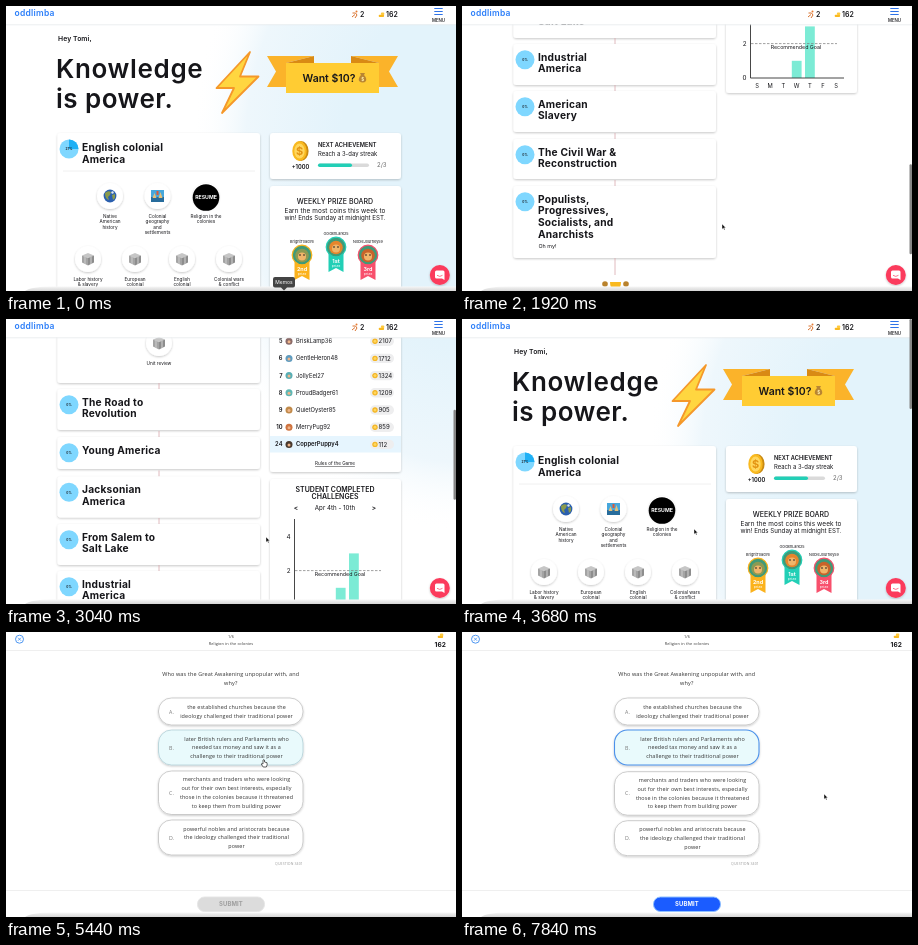
Recreate the animation shown at these times as an HTML page. Size 450 by 285 pixels, loop 8000 ms.

```html
<!DOCTYPE html>
<html lang="en">
<head>
<meta charset="utf-8">
<title>Course dashboard and quiz</title>
<style>
html, body { margin: 0; width: 100%; height: 100%; overflow: hidden; background: #fff; }
svg { display: block; width: 100%; height: 100%; }
text { font-family: Inter, sans-serif; white-space: pre; }
.quiz text { font-family: "Open Sans", sans-serif; letter-spacing: .12px; }
.quiz .strong { font-family: Inter, sans-serif; }
</style>
</head>
<body>
<svg id="stage" viewBox="0 0 450 285" preserveAspectRatio="none">
  <defs>
    <radialGradient id="sky">
      <stop offset=".45" stop-color="#e3f3fb"/>
      <stop offset=".8" stop-color="#eef7fc"/>
      <stop offset="1" stop-color="#fff" stop-opacity="0"/>
    </radialGradient>
    <linearGradient id="dockFill" x2="0" y2="1">
      <stop offset="0" stop-color="#f6f6f6"/>
      <stop offset="1" stop-color="#d6d6d6"/>
    </linearGradient>
    <filter id="shadow" x="-20%" y="-20%" width="140%" height="150%">
      <feDropShadow dx="0" dy="1" stdDeviation="1.1" flood-opacity=".22"/>
    </filter>
  </defs>
  <rect width="450" height="285" fill="#fff"/>
  <g id="home"><g id="page"></g><g id="chrome"></g></g>
  <g id="quiz" class="quiz"></g>
  <path d="M19 285Q25 280.500 46 280.500H450V285Z" fill="url(#dockFill)"/>
  <g id="tip">
    <path d="M269 271H287Q289 271 289 273V279.500Q289 281.500 287 281.500H281L278 284.500L275 281.500H269Q267 281.500 267 279.500V273Q267 271 269 271Z" fill="#444"/>
  </g>
  <g id="arrow"><path d="M0 0V5.200L1.300 4.100L2.200 6L3.100 5.600L2.200 3.800H3.800Z" fill="#111" stroke="#fff" stroke-width=".4"/></g>
  <g id="hand"><path d="M-1 -3Q0 -4 .5 -3V-1L3 -.3Q3.700 2 2.300 4H-.8L-2.800 1Q-2.500 0 -1 1Z" fill="#fff" stroke="#222" stroke-width=".7"/></g>
</svg>
<script>
const $ = id => document.getElementById(id);
const INK = '#16161a', GOLD = '#f9b91f', BLUE = '#2d7ff9', TEAL = '#22cfb6';

// Markup helpers
const attrs = o => Object.entries(o).map(([k, v]) => ` ${k}="${v}"`).join('');
const text = (s, x, y, size, weight = 400, o = {}) =>
  `<text${attrs({ x, y, 'font-size': size, 'font-weight': weight, fill: INK, ...o })}>${s}</text>`;
const mid = (s, x, y, size, weight, o = {}) =>
  text(s, x, y, size, weight, { 'text-anchor': 'middle', ...o });
const rect = (x, y, w, h, fill, r = 0, o = {}) =>
  `<rect x="${x}" y="${y}" width="${w}" height="${h}" rx="${r}" fill="${fill}"${attrs(o)}/>`;
const dot = (x, y, r, fill, o = {}) => `<circle cx="${x}" cy="${y}" r="${r}" fill="${fill}"${attrs(o)}/>`;
const oval = (x, y, rx, ry, fill) => `<ellipse cx="${x}" cy="${y}" rx="${rx}" ry="${ry}" fill="${fill}"/>`;
const path = (d, fill = 'none', o = {}) => `<path d="${d}" fill="${fill}"${attrs(o)}/>`;
const line = (d, stroke, w = 1, o = {}) => path(d, 'none', { stroke, 'stroke-width': w, ...o });
const card = (x, y, w, h) => rect(x, y, w, h, '#fff', 3, { filter: 'url(#shadow)' });
const coin = (x, y, r) => dot(x, y, r, GOLD) +
  dot(x, y, r * .68, '#ffd75e', { stroke: '#e59a12', 'stroke-width': r * .14 });
const coinPile = (x, y) => rect(x - 2.8, y, 5.4, 2.2, GOLD, 1) + rect(x - .6, y - 2.2, 3.4, 2.6, '#ffc93c', 1);

function hero() {
  const wing = path('M261 50H308L280 57V81H261L270 65.500Z', '#fbb32a') +
    path('M280 57L308 50V57Z', '#d98a14');
  const flip = s => `<g transform="translate(653 0) scale(-1 1)">${s}</g>`;
  return oval(455, 150, 270, 350, 'url(#sky)') +
    text('Hey Tomi,', 52, 35, 6.8, 600, { 'letter-spacing': .1 }) +
    text('Knowledge', 50, 72, 26, 600, { 'letter-spacing': .65 }) +
    text('is power.', 50, 102, 26, 600, { 'letter-spacing': .45 }) +
    path('M244 46L210.500 82H228L216 107L252.500 70.500H234Z', '#ffd640',
      { stroke: '#f5982a', 'stroke-width': 1.8, 'stroke-linejoin': 'round' }) +
    wing + flip(wing) + rect(280, 57, 93, 30, '#ffcc33') +
    text('Want $10?', 296.500, 76, 10.5, 600) +
    path('M355 69L354 67H359L358 69Q361 72 360 75Q357 78 353 75Q352 72 355 69Z', '#b98532') +
    mid('$', 356.7, 75, 4.5, 700, { fill: '#fff0b0' });
}

// Topic icons, drawn around the origin
const gift = path('M0 -6L6 -3.500L0 -1L-6 -3.500Z', '#c6c6c6') +
  path('M-6 -3.500L0 -1V6.500L-6 3.500Z', '#a4a4a4') + path('M6 -3.500L0 -1V6.500L6 3.500Z', '#8d8d8d') +
  line('M-3 -2.200V5M3 -2.200V5', '#c9c9c9', 1.2);
const globe = dot(0, 0, 6.4, '#2a5fae') +
  path('M-5 -3Q-2 -6 1 -4L0 -1L-2 1L-1 4Q-5 3 -5 -3ZM2 -1L5 -2L5 2L3 4Z', '#8a9a4c') +
  dot(2.5, -3.5, 1.2, '#dfe9f2');
const scene = rect(-6.5, -6, 13, 12, '#46a7dc') + rect(-6.5, 1, 13, 5, '#276c9c') +
  path('M-5 2L-3 -3L-1 2ZM1 2L3 -4L5 2Z', '#e5c07a') + rect(-1, -5, 2, 4, '#d85a3a');
const resume = dot(0, 1.500, 13.300, '#000') + mid('RESUME', 0, 3.400, 5.2, 700, { fill: '#fff' });

const topic = (x, y, icon, label) =>
  `<g transform="translate(${x} ${y})">${dot(0, 0, 13, '#fff', { filter: 'url(#shadow)' })}${icon}</g>` +
  label.split('/').map((s, i) => mid(s, x, y + 21.700 + i * 5.4, 4.7, 400)).join('');

const titleLines = (lines, y) => lines.map((s, i) =>
  text(s, 76, y + i * 11.8, 10.2, 700, { 'letter-spacing': .2 })).join('');

function units() {
  let out = card(51.5, 127, 202.5, 224) + dot(63, 143, 9.5, '#7fd7ff') +
    path('M63 143V133.500A9.500 9.500 0 0 1 72.500 143Z', '#1fb0f5') +
    mid('27%', 63, 144.2, 3.2, 600) + titleLines(['English colonial', 'America'], 144.7) +
    line('M57 165H249', '#ececec', .8) +
    topic(104, 190, globe, 'Native/American/history') +
    topic(151.5, 190, scene, 'Colonial/geography/and/settlements') +
    topic(200, 190, resume, 'Religion in the/colonies') +
    topic(82, 253, gift, 'Labor history/&amp; slavery') +
    topic(129, 253, gift, 'European/colonial/powers') +
    topic(176, 253, gift, 'English/colonial/people') +
    topic(223, 253, gift, 'Colonial wars/&amp; conflict') +
    topic(153, 311, gift, 'Unit review');
  const rows = [
    [357, 41, 'The Road to/Revolution'], [405, 32, 'Young America'],
    [444.5, 41, 'Jacksonian/America'], [492, 41, 'From Salem to/Salt Lake'],
    [539, 41, 'Industrial/America'], [586, 41, 'American/Slavery'],
    [634, 40, 'The Civil War &amp;/Reconstruction'],
    [681, 72, 'Populists,/Progressives,/Socialists, and/Anarchists']
  ];
  for (const [y, h, title] of rows) {
    out += line(`M153 ${y - 6}V${y}`, '#d9a9ae', .8) + card(51.5, y, 202.5, h) +
      dot(63, y + 15.8, 9.5, '#7fd7ff') + mid('0%', 63, y + 17, 3.2, 600) +
      titleLines(title.split('/'), y + 16.600);
  }
  const bust = x => dot(x, 779, 2.8, '#b9822c') + path(`M${x - 6} 790Q${x} 775 ${x + 6} 790Z`, '#c8902d');
  return out + text('Oh my!', 76.5, 743, 5.4) + line('M153 753V770', '#d9a9ae', .8) +
    bust(143) + bust(164) +
    path('M148 777H159Q159 784 154.500 786V790H158V793H149V790H152.500V786Q148 784 148 777Z', GOLD);
}

function achievement() {
  return card(264, 127, 131, 46) + oval(295, 145, 7.600, 10, '#c98a12') +
    oval(293.500, 145, 7.200, 10, GOLD) + oval(293.500, 145, 5.200, 7.600, '#ffd75e') +
    mid('$', 293.500, 149, 11, 700, { fill: '#e39312' }) +
    mid('+1000', 294.500, 163, 5.7, 600) +
    text('NEXT ACHIEVEMENT', 312, 141, 5.7, 600) +
    text('Reach a 3-day streak', 312, 150, 5.9) +
    rect(312, 157.500, 51, 3.400, '#dadada', 1.700) + rect(312, 157.500, 34, 3.400, TEAL, 1.700) +
    text('2/3', 371, 161.300, 6, 400, { fill: '#666' });
}

function medal(x, y, place, color, skin, name) {
  return mid(name, x, y - 12.500, 3.8, 400) +
    path(`M${x - 7.500} ${y + 5}H${x + 7.500}V${y + 25}L${x} ${y + 21}L${x - 7.500} ${y + 25}Z`, color) +
    dot(x, y, 9.800, '#3f9a78', { stroke: color, 'stroke-width': 1.200 }) +
    dot(x, y + .5, 6.800, skin) + dot(x, y + 1.500, 4, '#f0b56a') +
    dot(x - 2, y, .8, INK) + dot(x + 2, y, .8, INK) +
    mid(place, x, y + 15.500, 5.4, 700, { fill: '#fff' }) +
    mid('prize', x, y + 20, 3.6, 400, { fill: '#fff' });
}

function prizeBoard() {
  const rows = [
    [4, 'CalmOtter18', 2240, '#d99a5a'], [5, 'BriskLamp36', 2107, '#8a6a68'],
    [6, 'GentleHeron48', 1712, '#5f9cc0'], [7, 'JollyEel27', 1324, '#58aeb4'],
    [8, 'ProudBadger61', 1209, '#5fb7b4'], [9, 'QuietOyster85', 905, '#c08a4a'],
    [10, 'MerryPug92', 859, '#cf7440'], [24, 'CopperPuppy4', 112, '#4a3a2e']
  ];
  let out = card(264, 180, 131, 260) + mid('WEEKLY PRIZE BOARD', 329, 197.500, 7, 500) +
    mid('Earn the most coins this week to', 329, 207, 6.4, 400, { 'letter-spacing': .1 }) +
    mid('win! Ends Sunday at midnight EST.', 329, 214, 6.2, 400) +
    medal(296, 249, '2nd', '#fbb21c', '#8c9a52', 'BrightToad76') +
    medal(330, 241, '1st', TEAL, '#e7852d', 'GoldenLark25') +
    medal(362, 249, '3rd', '#f8506c', '#c8632a', 'NobleJourney59') +
    rect(264, 404, 131, 16.500, '#e6f5fe');
  rows.forEach(([rank, name, coins, tint], i) => {
    const y = 292 + i * 17.200, weight = rank === 24 ? 600 : 400;
    out += text(rank, 276.500, y + 2, 5.8, 600, { 'text-anchor': 'end' }) +
      dot(283, y, 3.500, tint) + dot(283, y + .5, 1.500, '#f0b58a') +
      text(name, 290, y + 2, 5.800, weight) +
      rect(364, y - 4.700, 24, 9.400, '#eeeeef', 4.700) + coin(369, y, 2.700) +
      text(coins, 372.500, y + 2.200, 6.100, 400);
  });
  return out + mid('Rules of the Game', 329, 433, 4.600, 400, { 'text-decoration': 'underline' });
}

function chart() {
  const base = 573, unit = 17.2;
  const bar = (x, n) => rect(x, base - n * unit, 9.800, n * unit, '#7cebd5');
  return card(264, 447, 131, 141) +
    mid('STUDENT COMPLETED', 329, 459.800, 7, 600) + mid('CHALLENGES', 329, 467, 7, 600) +
    mid('&lt;', 290, 478, 6.500, 600) + mid('&gt;', 368, 478, 6.500, 600) +
    mid('Apr 4th - 10th', 329, 478, 6.200) +
    bar(329.800, 1) + bar(343, 3) +
    line('M289 538.600H375', '#777', .7, { 'stroke-dasharray': '2.500 1.500' }) +
    line('M288.500 487V573H382', '#333', .9) +
    [0, 2, 4].map(n => text(n, 284.500, base - n * unit + 2.400, 6.300, 400, { 'text-anchor': 'end' })).join('') +
    mid('Recommended Goal', 334, 543.800, 5.300) +
    [...'SMTWTFS'].map((d, i) => mid(d, 295 + i * 13.200, 582.500, 5.800)).join('');
}

function chrome() {
  return rect(0, 0, 450, 18.500, '#fff') + line('M0 18.800H450', '#e4e8ea', .7) +
    text('oddlimba', 8.500, 10, 8.500, 600, { fill: BLUE, 'letter-spacing': .25 }) +
    dot(350.500, 5.500, 1, '#e77b32') +
    line('M346.500 7H349.500L351 9L349 12M349 8.500L346 11', '#d9722e', 1) +
    text('2', 354, 10.800, 7, 600) + coinPile(375.500, 8.700) + text('162', 380, 10.800, 7, 600) +
    line('M428.300 2.500H436.700M428.300 5.500H436.700M428.300 8.500H436.700', '#2d72e8', 1.200) +
    mid('MENU', 432.500, 15.800, 4.400, 500) +
    dot(433.800, 269, 10, '#fb3a5c', { filter: 'url(#shadow)' }) +
    path('M430.500 264.500H437Q438.500 264.500 438.500 266V274L436 272.500H430.500Q429 272.500 429 271V266Q429 264.500 430.500 264.500Z', '#fff') +
    line('M431 269.300Q433.800 271.500 436.500 269.300', '#fb3a5c', .7) +
    rect(447.500, 0, 2.500, 90, '#858585', 1.200, { id: 'thumb' });
}

const answers = [
  ['A', 66, 27, 'the established churches because the/ideology challenged their traditional power'],
  ['B', 98, 35, 'later British rulers and Parliaments who/needed tax money and saw it as a/challenge to their traditional power'],
  ['C', 139, 43.500, 'merchants and traders who were looking/out for their own best interests, especially/those in the colonies because it threatened/to keep them from building power'],
  ['D', 188, 35, 'powerful nobles and aristocrats because/the ideology challenged their traditional/power']
];

function quiz() {
  const q = { fill: '#333' };
  const pill = ([key, y, h, body]) => {
    const lines = body.split('/'), top = y + h / 2 - (lines.length - 1) * 4.400 + 1.800;
    return `<g id="answer${key}">` +
      rect(152.500, y, 144.500, h, '#fff', 13, { stroke: '#b9b9b9', 'stroke-width': .7, filter: 'url(#shadow)' }) +
      mid(key + '.', 165.500, y + h / 2 + 2, 5.200, 400, { fill: '#777' }) +
      lines.map((s, i) => mid(s, 230.500, top + i * 8.800, 5.400, 400, q)).join('') + '</g>';
  };
  return rect(0, 0, 450, 285, '#fff') +
    dot(13.500, 7.200, 4, '#fff', { stroke: '#3c8cf0', 'stroke-width': .9 }) +
    line('M12 5.700L15 8.700M15 5.700L12 8.700', '#3c8cf0', .8) +
    mid('1/6', 225, 5.800, 3.900, 400, q) + mid('Religion in the colonies', 225, 12.600, 3.900, 400, q) +
    line('M0 18.500H450M0 258.500H450', '#ebebeb', .8) +
    coinPile(434.500, 3.800) + mid('162', 434.300, 15.300, 6.600, 700, { class: 'strong' }) +
    mid('Who was the Great Awakening unpopular with, and', 224.700, 44, 5.500, 400, q) +
    mid('why?', 224.700, 53, 5.500, 400, q) + answers.map(pill).join('') +
    text('QUESTION 3401', 297, 232.500, 3.500, 400, { 'text-anchor': 'end', fill: '#999' }) +
    rect(191.500, 265, 67, 14.500, '#dcdcdc', 7, { id: 'submit' }) +
    mid('SUBMIT', 225, 274.300, 5.900, 700, { id: 'submitText', class: 'strong' });
}

$('page').innerHTML = hero() + units() + achievement() + prizeBoard() + chart();
$('chrome').innerHTML = chrome();
$('quiz').innerHTML = quiz();
$('tip').innerHTML += mid('Memos', 278, 278.200, 5, 400, { fill: '#fff' });

// Keyframes: [time, value...]
const LOOP = 8000, STEP = 160, OPEN = 4320, HOVER = 5120, PICK = 6560;
const scrollKeys = [[0, 0], [560, 0], [800, 70], [1280, 298], [1600, 420], [1920, 501], [2240, 530],
  [2480, 530], [2720, 450], [3040, 287], [3360, 80], [3600, 0]];
const cursorKeys = [[0, 277, 292], [480, 260, 218], [3360, 260, 218], [3640, 232, 210],
  [3780, 232, 210], [4080, 202, 194], [4480, 202, 194], [5280, 258, 131],
  [6640, 258, 131], [7360, 362, 162]];

function sample(keys, t, ease = u => u) {
  const i = keys.findIndex(k => k[0] > t);
  if (i < 0) return keys[keys.length - 1].slice(1);
  const a = keys[i - 1], b = keys[i], u = ease((t - a[0]) / (b[0] - a[0]));
  return a.slice(1).map((v, n) => v + (b[n + 1] - v) * u);
}
const smooth = u => u * u * (3 - 2 * u);
const show = (id, on) => $(id).setAttribute('display', on ? 'inline' : 'none');
const move = (id, x, y) => $(id).setAttribute('transform', `translate(${x} ${y})`);
const style = (el, o) => Object.entries(o).forEach(([k, v]) => el.setAttribute(k, v));

function draw(t) {
  const [scroll] = sample(scrollKeys, t);
  const [x, y] = sample(cursorKeys, t, smooth);
  const inQuiz = t >= OPEN, picked = t >= PICK;
  const overB = t >= HOVER && x < 297;
  const overLink = overB || (t >= 4000 && t < OPEN);

  show('home', !inQuiz);
  show('quiz', inQuiz);
  show('tip', t < STEP);
  move('page', 0, -scroll);
  show('thumb', t > 560 && t < 4000);
  $('thumb').setAttribute('y', scroll * .316);

  style($('answerB').firstChild, {
    fill: picked || overB ? '#e9fafc' : '#fff',
    stroke: picked ? '#4b91ea' : overB ? '#a9c9d2' : '#b9b9b9',
    'stroke-width': picked ? 1.1 : .7
  });
  for (const key of 'CD') move('answer' + key, 0, picked ? .7 : 0);
  style($('submit'), {
    fill: picked ? '#1b5cff' : '#dcdcdc',
    stroke: picked ? '#8fc0ff' : '#e6e6e6', 'stroke-width': 1
  });
  $('submitText').setAttribute('fill', picked ? '#fff' : '#9d9d9d');

  show('arrow', !overLink);
  show('hand', overLink);
  move('arrow', x, y);
  move('hand', x, y);
}

function tick(now) {
  const t = now % LOOP;
  draw(t - t % STEP);
  requestAnimationFrame(tick);
}
draw(0);
requestAnimationFrame(tick);
</script>
</body>
</html>
```
